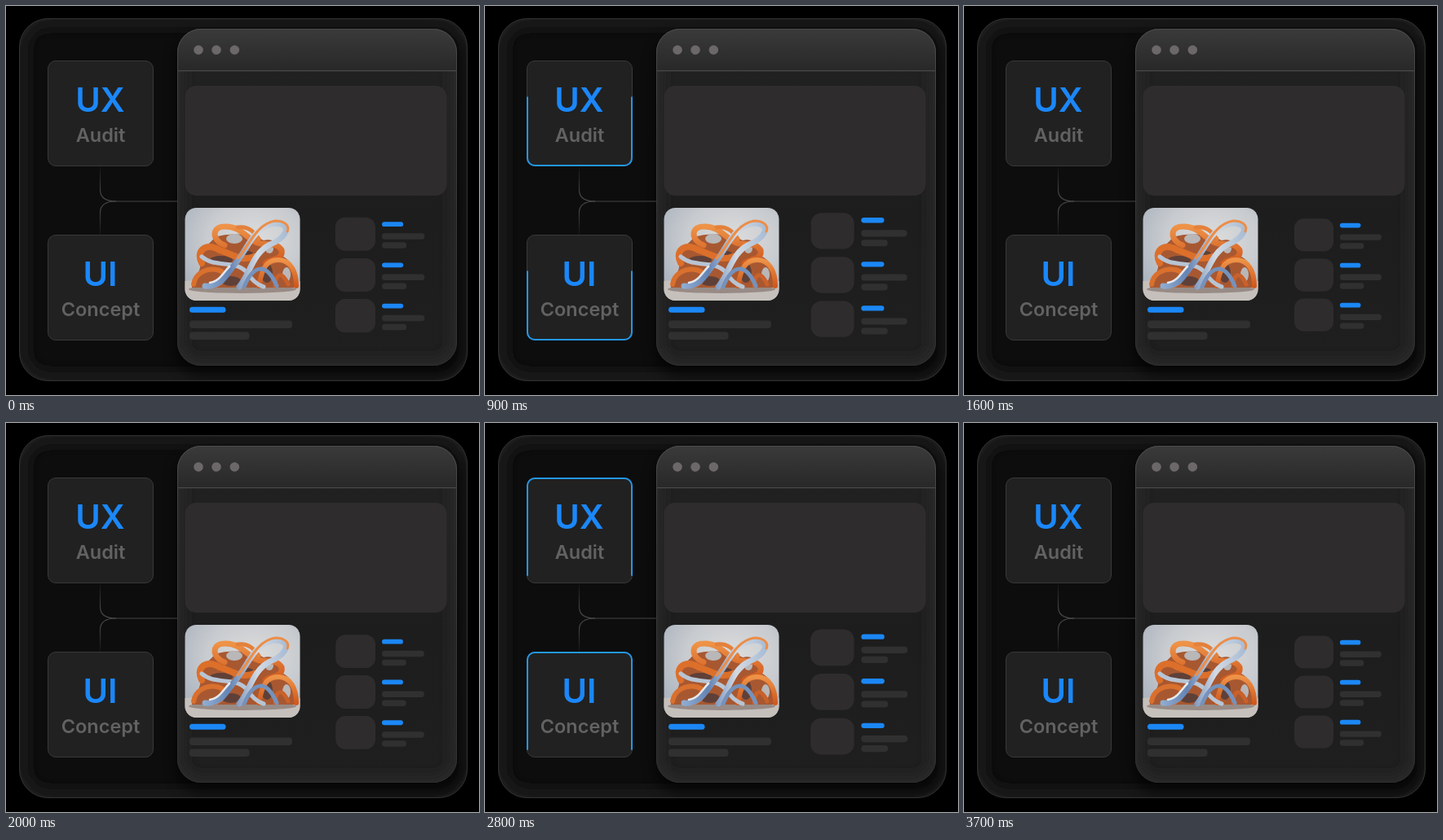
Write an HTML page that moves like this. It is 580 by 478 pixels and loops after 3.8 s.

```html
<!DOCTYPE html>
<html lang="en">
<head>
<meta charset="utf-8">
<title>UX audit and UI concept</title>
<style>
  html, body { margin: 0; width: 100%; height: 100%; overflow: hidden; background: #000; }
  svg { display: block; width: 100%; height: 100%; }
  text { font-family: Inter, Roboto, sans-serif; font-weight: 600; text-anchor: middle; }
  .title { font-size: 41.5px; fill: #1b87f9; }
  .label { font-size: 23.5px; fill: #626262; }
  .block { fill: #2f2c2e; }
  .line { fill: #303030; }
  .accent { fill: #1b87f5; }
  .ribbons { fill: none; stroke-linecap: round; stroke-linejoin: round; }
</style>
</head>
<body>
<svg viewBox="0 0 580 478">
  <defs>
    <linearGradient id="head" x2="0" y2="1">
      <stop offset="0" stop-color="#3a3a3a"/>
      <stop offset="1" stop-color="#282828"/>
    </linearGradient>
    <linearGradient id="body" x2="0" y2="1">
      <stop offset="0" stop-color="#222"/>
      <stop offset=".55" stop-color="#1d1d1d"/>
      <stop offset="1" stop-color="#1f1f1f"/>
    </linearGradient>
    <linearGradient id="rim" x2="0" y2="1">
      <stop offset="0" stop-color="#4c4c4c"/>
      <stop offset=".3" stop-color="#3c3c3c"/>
      <stop offset="1" stop-color="#2f2f2f"/>
    </linearGradient>
    <linearGradient id="wire" gradientUnits="userSpaceOnUse" x1="0" y1="198" x2="0" y2="282">
      <stop offset="0" stop-color="#444" stop-opacity=".1"/>
      <stop offset=".4" stop-color="#484848"/>
      <stop offset=".6" stop-color="#484848"/>
      <stop offset="1" stop-color="#444" stop-opacity=".1"/>
    </linearGradient>
    <radialGradient id="wall" cx=".6" cy=".35" r=".75">
      <stop offset="0" stop-color="#dddddd"/>
      <stop offset=".55" stop-color="#c8cbcf"/>
      <stop offset="1" stop-color="#aab2bd"/>
    </radialGradient>
    <linearGradient id="flow" x1="0" x2="1">
      <stop offset="0" stop-color="#8fabd0"/>
      <stop offset=".3" stop-color="#6484b4"/>
      <stop offset=".65" stop-color="#d3dae3"/>
      <stop offset="1" stop-color="#a9bdd6"/>
    </linearGradient>
    <linearGradient id="warm" x2="0" y2="1">
      <stop offset="0" stop-color="#ee9348"/>
      <stop offset="1" stop-color="#d0591e"/>
    </linearGradient>
    <filter id="soft" x="-20%" y="-20%" width="140%" height="140%">
      <feGaussianBlur stdDeviation="8"/>
    </filter>
    <clipPath id="photo"><rect x="219.500" y="248" width="141" height="114" rx="14"/></clipPath>
    <clipPath id="inside"><rect x="16" y="15" width="550" height="446" rx="36"/></clipPath>
    <clipPath id="window"><rect x="210" y="28" width="343" height="414" rx="29"/></clipPath>
    <clipPath id="sweep"><rect id="band" x="48" width="136"/></clipPath>
  </defs>

  <rect width="580" height="478"/>
  <g clip-path="url(#inside)">
    <rect x="16" y="15" width="550" height="446" fill="#0d0d0d"/>
    <rect x="16" y="15" width="550" height="446" rx="36" fill="none" stroke="#1c1c1c" stroke-width="22" filter="url(#soft)"/>
    <rect x="208" y="36" width="352" height="418" rx="30" opacity=".6" filter="url(#soft)"/>
  </g>
  <rect x="16.5" y="15.5" width="549" height="445" rx="35.5" fill="none" stroke="#303030"/>
  <g fill="none" stroke="url(#wire)" stroke-width="1.2">
    <path d="M115.5 198V226C115.5 235 121 240 135 240"/>
    <path d="M115.500 282V254C115.500 245 121 240 135 240"/>
    <path d="M134 240H210.5" stroke="#444"/>
  </g>
  <g id="cards"></g>

  <g clip-path="url(#window)">
    <rect x="210" y="28" width="343" height="414" fill="url(#body)"/>
    <rect x="210" y="28" width="343" height="414" rx="29" fill="none" stroke="#2a2a2a" stroke-width="14" filter="url(#soft)"/>
    <rect x="210" y="28" width="343" height="52" fill="url(#head)"/>
    <rect x="210" y="79" width="343" height="1.2" fill="#4a4a4a"/>
  </g>
  <rect x="210.5" y="28.5" width="342" height="413" rx="28.5" fill="none" stroke="url(#rim)"/>
  <g fill="#6c686a">
    <circle cx="236" cy="54" r="5.800"/><circle cx="258" cy="54" r="5.800"/><circle cx="280.300" cy="54" r="5.800"/>
  </g>
  <rect class="block" x="219.500" y="98" width="321" height="135" rx="14"/>

  <g clip-path="url(#photo)">
    <rect x="219" y="248" width="142" height="114" fill="url(#wall)"/>
    <path d="M219 338Q290 330 361 338V362H219Z" fill="#c6c0bc"/>
    <ellipse cx="290" cy="348" rx="66" ry="5" fill="#85766f" opacity=".7"/>
    <path d="M228 346C227 332 240 330 238 316C232 300 250 294 256 284C276 278 300 280 316 288C330 284 342 296 340 308C352 314 357 330 357 346Z" fill="#a85831"/>
    <g fill="#5f4038">
      <ellipse cx="264" cy="312" rx="14" ry="5"/>
      <ellipse cx="296" cy="306" rx="8" ry="5"/>
      <ellipse cx="320" cy="328" rx="7" ry="12"/>
      <ellipse cx="276" cy="338" rx="12" ry="6"/>
    </g>
    <g fill="#b9b7b8">
      <ellipse cx="280" cy="286" rx="10" ry="6"/>
      <ellipse cx="323" cy="298" rx="5" ry="6"/>
      <ellipse cx="344" cy="330" rx="5" ry="9"/>
    </g>
    <g class="ribbons">
      <path d="M240 316C232 300 246 290 262 300C280 306 288 314 304 308" stroke="#dc6f2a" stroke-width="8"/>
      <path d="M230 342C232 328 246 322 258 324C272 326 270 338 256 344" stroke="#d9702e" stroke-width="6"/>
      <path d="M268 294C252 288 252 271 268 271C286 270 294 284 306 290C318 296 330 288 338 300C340 312 326 310 318 316" stroke="url(#warm)" stroke-width="7"/>
      <path d="M284 272C298 270 304 278 310 286" stroke="#e4813a" stroke-width="5"/>
      <path d="M310 344C314 324 318 312 334 312C350 312 356 328 356 344" stroke="url(#warm)" stroke-width="6"/>
      <path d="M330 344C330 330 338 324 346 342" stroke="#c9612a" stroke-width="5"/>
      <path d="M240 308C256 322 280 312 294 326C302 336 306 342 316 345" stroke="#b8c4d3" stroke-width="5"/>
      <path d="M244 344C264 346 270 330 280 318C296 300 304 269 330 267C354 268 342 286 324 293C302 304 300 328 286 345" stroke="url(#flow)" stroke-width="7"/>
      <path d="M284 310C298 296 306 268 330 264C342 264 348 270 345 277" stroke="#ec8e48" stroke-width="3"/>
      <path d="M292 345C304 316 320 316 332 344" stroke="#7592bc" stroke-width="5"/>
      <path d="M250 340C262 338 266 328 274 320" stroke="#e4e9ee" stroke-width="2.500"/>
    </g>
  </g>

  <rect class="accent" x="225" y="369.800" width="44.500" height="7" rx="3.500"/>
  <rect class="line" x="225" y="386.500" width="126" height="9.500" rx="4"/>
  <rect class="line" x="225" y="400.500" width="73.500" height="9.500" rx="4"/>
  <g id="list"></g>
</svg>
<script>
  const LOOP = 3800, STEP = 100;
  const PULSE = 2060, PEAK = 700;
  const SWEEP = 2100, CARD = 130;
  const ORIGIN = { x: 457, y: 331 };
  // phase in ms, distance of the sweep's leading edge below the card top
  const SWEEP_KEYS = [[20, 0], [300, 43], [600, 94], [1100, 228], [1200, 252], [1300, 276]];

  const byId = id => document.getElementById(id);

  const card = (y, title, label) => `
    <g transform="translate(0 ${y})">
      <rect x="51.5" y="67.5" width="129" height="129" rx="9.5" fill="#212121" stroke="#393939"/>
      <text class="title" x="115.5" y="130">${title}</text>
      <text class="label" x="116" y="167">${label}</text>
      <g clip-path="url(#sweep)">
        <rect x="52" y="68" width="128" height="128" rx="9" fill="none" stroke="#2397e6" stroke-width="2"/>
      </g>
    </g>`;

  const row = y => `
    <g transform="translate(0 ${y})">
      <rect class="block" x="404" y="0" width="49" height="41" rx="12"/>
      <rect class="accent" x="461" y="5.500" width="26" height="5.800" rx="2.900"/>
      <rect class="line" x="461" y="19.500" width="52" height="7.500" rx="3.500"/>
      <rect class="line" x="461" y="30.500" width="30" height="7.500" rx="3.500"/>
    </g>`;

  byId('cards').innerHTML = card(0, 'UX', 'Audit') + card(214, 'UI', 'Concept');
  byId('list').innerHTML = [260, 310, 360].map(row).join('');

  function along(keys, x) {
    const i = keys.findIndex(k => k[0] > x);
    if (i === 0) return 0;
    if (i < 0) return 2 * CARD + 20;
    const [x0, y0] = keys[i - 1], [x1, y1] = keys[i];
    return y0 + (y1 - y0) * (x - x0) / (x1 - x0);
  }

  function draw(t) {
    const scale = 1.035 + 0.0576 * Math.cos(2 * Math.PI * (t - PEAK) / PULSE);
    const { x, y } = ORIGIN;
    byId('list').setAttribute('transform', `translate(${x} ${y}) scale(${scale}) translate(${-x} ${-y})`);

    const front = along(SWEEP_KEYS, t % SWEEP);
    const top = Math.max(0, front - CARD), bottom = Math.min(CARD, front);
    const band = byId('band');
    band.setAttribute('y', 67 + top);
    band.setAttribute('height', Math.max(0, bottom - top));
  }

  const start = performance.now();
  function tick() {
    const t = (performance.now() - start) % LOOP;
    draw(Math.floor(t / STEP) * STEP);
    requestAnimationFrame(tick);
  }
  draw(0);
  requestAnimationFrame(tick);
</script>
</body>
</html>
```
